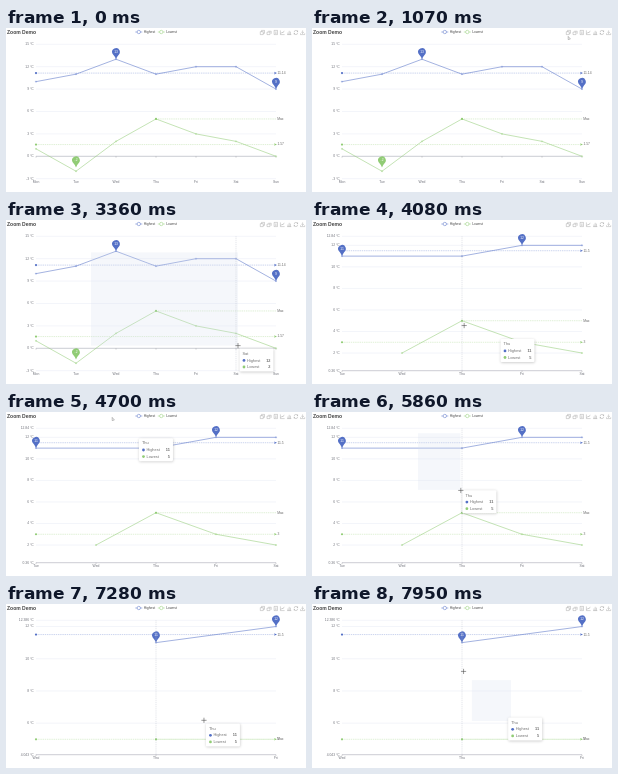
An HTML page with a canvas that plays this animation: 300x164 px, repeating every 8000 ms.

```html
<!DOCTYPE html>
<html lang="en">
<head>
<meta charset="utf-8">
<title>Zoom Demo</title>
<style>
  html, body { margin: 0; width: 100%; height: 100%; overflow: hidden; background: #fff; }
  canvas { display: block; width: 300px; height: 164px; }
</style>
</head>
<body>
<canvas id="stage"></canvas>
<script>
const LOOP = 8000, W = 300, H = 164;
const grid = { l: 30, r: 270, t: 16.3, b: 150.7 };
const days = ['Mon', 'Tue', 'Wed', 'Thu', 'Fri', 'Sat', 'Sun'];
const BLUE = '#5470c6', GREEN = '#91cc75', GREY = '#6e7079';
const series = [
  { name: 'Highest', color: BLUE, data: [10, 11, 13, 11, 12, 12, 9] },
  { name: 'Lowest', color: GREEN, data: [1, -2, 2, 5, 3, 2, 0] }
];
// pointer moves: start, duration, x, y
const moves = [
  [300, 620, 257, 10], [1150, 750, 100, 108], [1950, 250, 85, 32.43],
  [2800, 540, 232, 125.61], [3800, 400, 150, 105], [4340, 130, 140, 28],
  [4540, 160, 107, 7], [4750, 450, 106, 21.187], [5300, 800, 150, 80],
  [6350, 460, 190, 111.038], [7050, 450, 199, 117], [7850, 300, 132, 47]
];
const drags = [[2800, 3610], [5300, 6920], [7850, LOOP]];
const icons = [
  'M0 3H7V10H0ZM3 3V0H10V7H7',
  'M0 4H7V10H0ZM3 2H10V8',
  'M1 0H9V10H1ZM3 4H7M3 7H7',
  'M0 0V10H10M1 8L4 4L6 6L9 1',
  'M0 10H10M2 10V5M5 10V1M8 10V3',
  'M1 4A4 4 0 0 1 9 4V0M9 6A4 4 0 0 1 1 6V10',
  'M5 0V7M2 4L5 7L8 4M0 7V10H10V7'
].map(d => new Path2D(d));

const canvas = document.getElementById('stage');
const dpr = window.devicePixelRatio || 1;
canvas.width = W * dpr;
canvas.height = H * dpr;
const c = canvas.getContext('2d');

const mix = (a, b, p) => a + (b - a) * p;
const ease = p => p < 0.5 ? 4 * p ** 3 : 1 - (2 - 2 * p) ** 3 / 2;
const within = (v, [a, b]) => v >= a && v <= b;
const inGrid = p => within(p.x, [grid.l, grid.r]) && within(p.y, [grid.t, grid.b]);
const dayAt = (px, [a, b]) => Math.round(mix(a, b, (px - grid.l) / (grid.r - grid.l)));
const valueAt = (py, [a, b]) => mix(b, a, (py - grid.t) / (grid.b - grid.t));

function pointer(t) {
  let pos = { x: 182, y: 164 };
  for (const [at, time, x, y] of moves) {
    if (t <= at) break;
    const p = 1 - (1 - Math.min(1, (t - at) / time)) ** 3;
    pos = { x: mix(pos.x, x, p), y: mix(pos.y, y, p) };
  }
  return pos;
}

// Each finished drag turns its rectangle into the next visible range.
const views = [{ at: 0, x: [0, 6], y: [-3, 15] }];
for (const [from, to] of drags.filter(d => d[1] < LOOP)) {
  const a = pointer(from), b = pointer(to), last = views.at(-1);
  views.push({
    at: to,
    x: [dayAt(a.x, last.x), dayAt(b.x, last.x)],
    y: [valueAt(b.y, last.y), valueAt(a.y, last.y)]
  });
}

function ticks([lo, hi]) {
  const step = hi - lo > 15 ? 3 : 2, list = [lo];
  for (let v = (Math.floor(lo / step) + 1) * step; v < hi; v += step) list.push(v);
  return [...list, hi];
}

function line(pts, color, width, dash = []) {
  c.beginPath();
  pts.forEach(([x, y]) => c.lineTo(x, y));
  c.setLineDash(dash);
  c.strokeStyle = color;
  c.lineWidth = width;
  c.stroke();
  c.setLineDash([]);
}

function dot(x, y, r, fill, stroke) {
  c.beginPath();
  c.arc(x, y, r, 0, 7);
  c.fillStyle = fill;
  c.fill();
  if (stroke) {
    c.strokeStyle = stroke;
    c.lineWidth = 0.5;
    c.stroke();
  }
}

function text(s, x, y, { size = 3.36, color = GREY, align = 'left', weight = 'normal' } = {}) {
  c.font = `${weight} ${size}px "Liberation Sans", Arial, sans-serif`;
  c.textAlign = align;
  c.textBaseline = 'middle';
  c.fillStyle = color;
  c.fillText(s, x, y);
}

function pin(x, y, color, label) {
  const r = 3.9, cy = y - 7.2;
  c.beginPath();
  c.arc(x, cy, r, 2.7, 0.44);
  c.quadraticCurveTo(x + 0.9, y - 2.6, x, y);
  c.quadraticCurveTo(x - 0.9, y - 2.6, x - 3.5, cy + 1.7);
  c.fillStyle = color;
  c.fill();
  text(label, x, cy + 0.1, { color: '#fff', align: 'center' });
}

function header() {
  text('Zoom Demo', 1, 4.3, { size: 5.04, color: '#464646', weight: 'bold' });
  series.forEach((s, i) => {
    const x = 129.3 + 22.5 * i;
    line([[x, 4], [x + 7, 4]], s.color, 0.5);
    dot(x + 3.5, 4, 1.7, '#fff', s.color);
    text(s.name, x + 8.4, 4.1, { color: '#444' });
  });
  icons.forEach((icon, i) => {
    c.save();
    c.translate(254.3 + 6.7 * i, 2.4);
    c.scale(0.42, 0.42);
    c.strokeStyle = '#777';
    c.lineWidth = 0.75;
    c.stroke(icon);
    c.restore();
  });
}

function axes(view, level, X, Y) {
  const axisY = Y(Math.max(0, view.y[0]));
  for (const v of ticks(view.y)) {
    const y = Y(v);
    line([[grid.l, y], [grid.r, y]], '#e0e6f1', 0.4);
    text(+v.toFixed(level + 1) + ' °C', 27.8, y, { align: 'right' });
  }
  line([[grid.l, axisY], [grid.r, axisY]], GREY, 0.3);
  for (let i = view.x[0]; i <= view.x[1]; i++) {
    line([[X(i), axisY], [X(i), axisY + 1.4]], GREY, 0.3);
    text(days[i], X(i), 154.2, { align: 'center' });
  }
}

function averageLine(y, color, label) {
  line([[grid.l, y], [grid.r, y]], color, 0.3, [1.4, 0.8]);
  dot(grid.l, y, 1.1, color);
  c.beginPath();
  c.moveTo(grid.r + 1, y);
  c.lineTo(grid.r - 2, y - 1.3);
  c.lineTo(grid.r - 1.2, y);
  c.lineTo(grid.r - 2, y + 1.3);
  c.fill();
  text(label, 271.4, y, { color: '#666' });
}

function plot(view, X, Y) {
  const sets = series.map(s => s.data.map((v, i) => ({ i, v }))
    .filter(p => within(p.i, view.x) && within(p.v, view.y)));
  sets.forEach((pts, k) => {
    const { color } = series[k];
    c.save();
    c.beginPath();
    c.rect(grid.l - 1, grid.t - 1, grid.r - grid.l + 2, grid.b - grid.t + 2);
    c.clip();
    line(pts.map(p => [X(p.i), Y(p.v)]), color, 0.54);
    c.restore();
    pts.forEach(p => dot(X(p.i), Y(p.v), 0.6, '#fff', color));
    const avg = pts.reduce((sum, p) => sum + p.v, 0) / pts.length;
    averageLine(Y(avg), color, +avg.toFixed(2));
  });

  const pick = (pts, fn) => pts.find(p => p.v === fn(...pts.map(q => q.v)));
  const top = pick(sets[1], Math.max);
  line([[grid.r, Y(top.v)], [X(top.i), Y(top.v)]], GREEN, 0.3, [1.4, 0.8]);
  dot(X(top.i), Y(top.v), 1.1, GREEN);
  text('Max', 271.2, Y(top.v), { color: '#666' });

  for (const fn of [Math.max, Math.min]) {
    const p = pick(sets[0], fn);
    pin(X(p.i), Y(p.v), BLUE, p.v);
  }
  if (within(1, view.x) && within(-1.5, view.y)) pin(X(1), Y(-1.5), GREEN, '-2');
}

function selection(t) {
  const drag = drags.find(d => t >= d[0] && t < d[1]);
  if (!drag) return;
  const a = pointer(drag[0]), b = pointer(Math.max(drag[0], t - 25));
  c.fillStyle = 'rgba(210,217,238,.22)';
  c.fillRect(a.x, a.y, b.x - a.x, b.y - a.y);
}

// The box trails the pointer by averaging its recent path.
function tooltip(t, view, X) {
  let back = 0;
  while (back <= 180 && !inGrid(pointer(t - back))) back += 10;
  if (t < 300 || back > 180) return;
  const day = dayAt(pointer(t - back).x, view.x);
  if (!back) line([[X(day), grid.t], [X(day), grid.b]], '#b9bec9', 0.4, [1.1, 0.8]);

  let x = 6.2, y = 6;
  const steps = 30;
  for (let k = 0; k < steps; k++) {
    const p = pointer(t - (k + 0.5) * 300 / steps);
    x += p.x / steps;
    y += p.y / steps;
  }
  const rows = series.filter(s => within(s.data[day], view.y));
  const w = 34, h = 9.6 + 6.7 * rows.length;
  c.save();
  c.shadowColor = 'rgba(0,0,0,.22)';
  c.shadowBlur = 2.8 * dpr;
  c.shadowOffsetX = 0.3 * dpr;
  c.shadowOffsetY = 0.6 * dpr;
  c.fillStyle = '#fff';
  c.beginPath();
  c.roundRect(x, y, w, h, 1.1);
  c.fill();
  c.restore();

  const style = { size: 3.92, color: '#6e6e6e' };
  text(days[day], x + 3, y + 5.2, style);
  rows.forEach((s, k) => {
    const ry = y + 11.8 + 6.6 * k;
    dot(x + 4.5, ry, 1.4, s.color);
    text(s.name, x + 7.5, ry, style);
    text(s.data[day], x + w - 3, ry, { ...style, align: 'right', weight: 'bold' });
  });
}

function cursor(t) {
  if (t < 300) return;
  const p = pointer(t), { x, y } = p;
  if (t > 1110 && inGrid(p)) {
    line([[x - 2.6, y], [x + 2.6, y]], '#444', 0.55);
    line([[x, y - 2.6], [x, y + 2.6]], '#444', 0.55);
    return;
  }
  line([[x + 1.4, y + 1], [x - 0.8, y - 1.6], [x - 0.8, y + 1.6], [x + 1.4, y + 1]], '#777', 0.45);
}

function draw(t) {
  c.setTransform(dpr, 0, 0, dpr, 0, 0);
  c.fillStyle = '#fff';
  c.fillRect(0, 0, W, H);

  const level = views.findLastIndex(v => t >= v.at);
  const view = views[level], from = views[Math.max(0, level - 1)];
  const p = ease(Math.min(1, (t - view.at) / 300));
  const range = axis => view[axis].map((v, k) => mix(from[axis][k], v, p));
  const [x0, x1] = range('x'), [y0, y1] = range('y');
  const X = v => mix(grid.l, grid.r, (v - x0) / (x1 - x0));
  const Y = v => mix(grid.b, grid.t, (v - y0) / (y1 - y0));

  header();
  axes(view, level, X, Y);
  plot(view, X, Y);
  selection(t);
  tooltip(t, view, X);
  cursor(t);
}

const start = performance.now();
function tick() {
  draw((performance.now() - start) % LOOP);
  requestAnimationFrame(tick);
}
tick();
</script>
</body>
</html>
```
